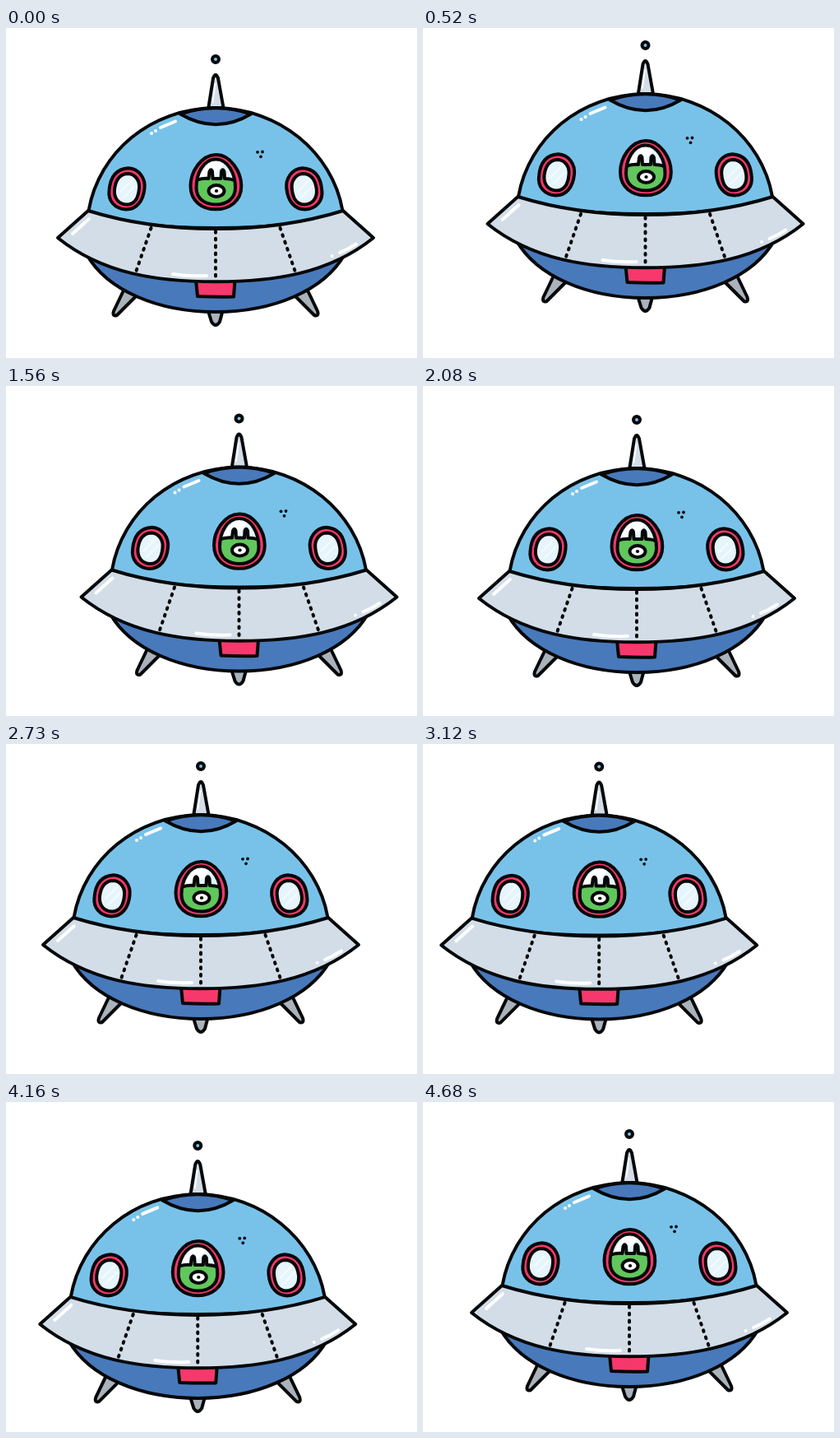
Animation, 500 px wide and 401 px high, one loop 4810 ms. Source, as an HTML page:

```html
<!DOCTYPE html>
<html lang="en">
<head>
<meta charset="utf-8">
<title>Hovering saucer</title>
<style>
  html, body { margin: 0; width: 100%; height: 100%; overflow: hidden; background: #fff; }
  svg { display: block; width: 100%; height: 100%; }
  #saucer { stroke: #050708; stroke-width: 4; stroke-linecap: round; stroke-linejoin: round; }
  .sky { fill: #78c2ea; }
  .navy { fill: #4879bb; }
  .metal { fill: #d2dde7; }
  .leg { fill: #aab2bb; }
  .pink { fill: #f7386c; }
  .glass { fill: #e6f5fb; }
  .green { fill: #61c65c; }
  .white { fill: #fff; }
  .line { fill: none; }
  .seam { fill: none; stroke-dasharray: 1.8 7; }
  .shine { fill: none; stroke: #fff; }
  .ink { fill: #050708; stroke: none; }
</style>
</head>
<body>
<svg viewBox="0 0 500 401">
  <defs>
    <path id="leg" class="leg" d="M143 319 L131 344 Q129 351 135 349 L160 324"/>
    <g id="porthole">
      <path class="pink" d="M149 170.200 C162 171 170 183 168.500 195 C167 210 159 220.500 146 220.500 C132 219.500 124 210 125.500 197 C127 180 135 171 149 170.200 Z"/>
      <path class="glass" d="M149 177 C158 178 163 186 162 195 C161 207 156 214.500 147 214.500 C137 214 131 207 132 196 C133.500 184 139 177 149 177 Z"/>
    </g>
    <path id="pane" d="M255.300 159.500 C270 159.500 279 177 279 194 C279 207.500 268 214.500 255.300 214.500 C242 214.500 231.500 207.500 231.500 194 C231.500 177 240 159.500 255.300 159.500 Z"/>
    <clipPath id="paneClip"><use href="#pane"/></clipPath>
  </defs>
  <g id="saucer">
    <!-- legs and lower hull -->
    <use href="#leg"/>
    <use href="#leg" transform="translate(510) scale(-1 1)"/>
    <path class="leg" d="M246 344 L250 357 Q255 365 260 357 L263.500 344"/>
    <path class="navy" d="M98 275 C123 319 185 345 255 345 C325 345 387 319 412 275 Z"/>
    <path class="pink" d="M231 306 L233 326 Q255 327 277 326.500 L278.500 306 Z"/>

    <!-- dome -->
    <path class="sky" d="M100.500 222 C113 151 176 97.300 255 97.300 C332 97.300 397 151 409.500 222 C365 250 145 250 100.500 222 Z"/>
    <path class="metal" d="M246.300 97 L252 61 Q255 53 258 61 L264.500 97 Z"/>
    <path class="shine" stroke-width="1.800" d="M251.500 90 L254.500 68"/>
    <path class="navy" d="M212 104.500 Q255.500 130 298 104.500 Q255 90 212 104.500 Z"/>
    <circle class="sky" cx="255" cy="38" r="4"/>

    <!-- ring -->
    <path class="metal" d="M100 222 C145 236 200 244 255 244 C310 244 365 236 410 222 L447 255 C392 299 325 308.300 255 308.300 C185 308.300 118 299 63 255 Z"/>
    <path class="seam" d="M176.500 243 L157.500 298 M255 247 V306 M333.500 243 L352.500 298"/>

    <!-- windows -->
    <use href="#porthole"/>
    <use href="#porthole" transform="translate(509.800) scale(-1 1)"/>
    <path class="shine" stroke-width="1.600" opacity=".7" d="M139 199 L154 184 M143 206 L157 192 M355 199 L369 185 M358 207 L373 192"/>
    <path class="pink" d="M255.300 154 C273 153.500 286.300 175 286.300 192 C286.300 210 272 220.300 255.300 220.300 C238 220.300 224.500 210 224.500 192 C224.500 175 237 154.500 255.300 154 Z"/>
    <g clip-path="url(#paneClip)">
      <path class="glass" stroke="none" d="M230 158 H280 V217 H230 Z"/>
      <path class="white" stroke="none" d="M230 184 L254 158 H272 L246 186 Z"/>
      <path class="green" d="M226 187 Q238 182 246.500 183 L247.500 174.500 Q249.500 170 251 174.500 L251.500 183 H261.500 L262 174.500 Q263.500 170 265.500 174.500 L266 183 Q274 183 284 187 V220 H226 Z"/>
      <ellipse class="white" cx="256" cy="198" rx="9.500" ry="7"/>
    </g>
    <use href="#pane" class="line"/>
    <ellipse class="ink" cx="256" cy="198" rx="2.200" ry="1.900"/>

    <!-- vents and highlights -->
    <g class="ink">
      <circle cx="306" cy="150.800" r="1.900"/>
      <circle cx="312" cy="150.500" r="1.900"/>
      <circle cx="310" cy="156.300" r="1.900"/>
    </g>
    <path class="shine" d="M188 121 L206 113.500 M182 125 h.1 M177 128 h.1 M81 250 L101 232 M203 299 Q222 302 244 301 M406 273 Q416 269 426 262.500 M396.500 277 h.1"/>
  </g>
</svg>
<script>
  const STEP = 130, COUNT = 37;
  // Flight path: [step, x, y]
  const path = [
    [0, 0, 0], [4, 15.5, -17], [5, 20, -18], [10, 36, -8], [12, 28.5, 1.5],
    [15, 12, 6], [16, 5, 3], [20, -12, -8], [21, -18, -11], [23, -33, -14],
    [25, -46, -4], [26, -47, 3], [27, -44, 10], [30, -31, 18], [35, -8, 5], [36, -4, 1]
  ];
  const saucer = document.getElementById('saucer');

  function key(i) {
    const n = path.length, lap = Math.floor(i / n);
    const [t, x, y] = path[i - lap * n];
    return [t + lap * COUNT, x, y];
  }

  // Slope that stays flat at turning points, so the path never overshoots
  function slope(i, axis) {
    const a = key(i - 1), b = key(i), c = key(i + 1);
    const before = (b[axis] - a[axis]) / (b[0] - a[0]);
    const after = (c[axis] - b[axis]) / (c[0] - b[0]);
    return before * after <= 0 ? 0 : 2 * before * after / (before + after);
  }

  function position(step, axis) {
    let i = path.length - 1;
    while (path[i][0] > step) i--;
    const a = key(i), b = key(i + 1), span = b[0] - a[0];
    const u = (step - a[0]) / span, v = 1 - u;
    return v * v * (1 + 2 * u) * a[axis] + u * u * (3 - 2 * u) * b[axis]
      + span * u * v * (v * slope(i, axis) - u * slope(i + 1, axis));
  }

  function draw(now) {
    const step = Math.floor(now / STEP) % COUNT;
    saucer.setAttribute('transform', `translate(${position(step, 1)} ${position(step, 2)})`);
    requestAnimationFrame(draw);
  }

  draw(0);
</script>
</body>
</html>
```
